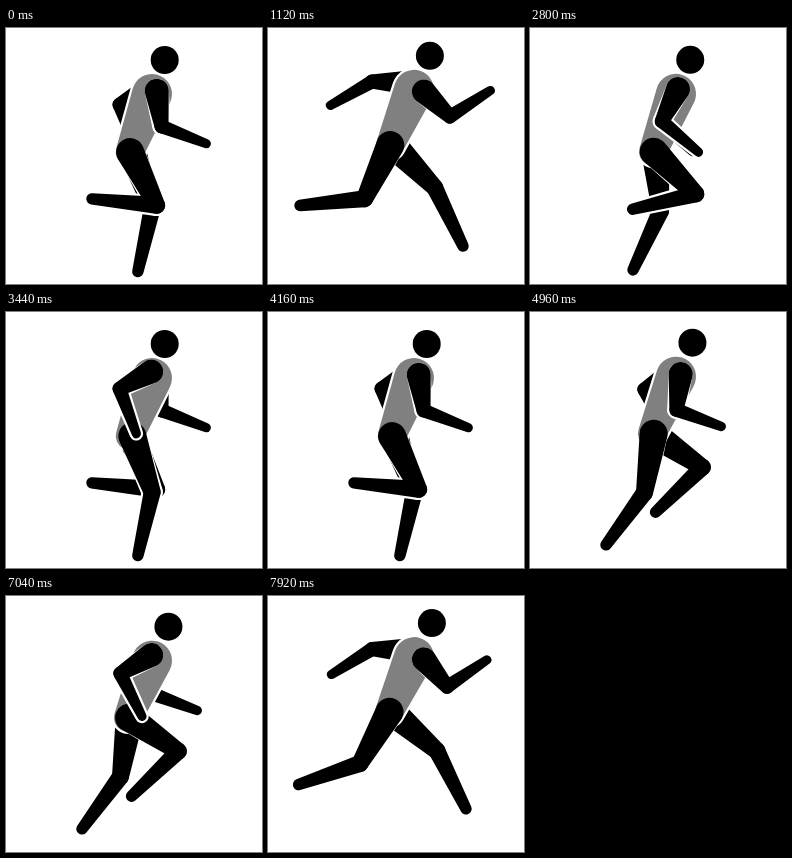
Write an HTML page with a canvas that moves like this. It is 256 by 256 pixels and loops after 8000 ms.

```html
<!DOCTYPE html>
<html lang="en">
<head>
<meta charset="utf-8">
<title>Runner</title>
<style>
  html, body { margin: 0; width: 100%; height: 100%; overflow: hidden; background: #fff; }
  canvas { display: block; width: 100vw; height: 100vh; }
</style>
</head>
<body>
<canvas id="stage" width="256" height="256"></canvas>
<script>
const ctx = document.getElementById('stage').getContext('2d');
const LOOP = 8000, TICK = 80;              // loop length and display step, ms
const POSE = 76.2, SHIFT = 27, POSES = 18; // the run cycle moves in even poses
const GAP = 2.2;                           // white line between body parts
const BLACK = '#000', GRAY = '#808080', WHITE = '#fff';

const cos = deg => Math.cos(deg * Math.PI / 180);
const sin = deg => Math.sin(deg * Math.PI / 180);

// Sum of harmonics of the cycle angle, each given as [amplitude, phase]
const wave = (turn, mean, ...parts) =>
  parts.reduce((sum, [amp, phase], i) => sum + amp * cos((i + 1) * turn - phase), mean);

// Joint angles: 0 points down, positive points forward
const thigh = turn => wave(turn, 17.1, [42.9, 85], [8, 43], [2.2, 95]);
const shin = turn => wave(turn, -37.8, [57.9, 134], [16.4, 182], [2.1, 233]);
const upperArm = turn => wave(turn, -27.5, [74, -66], [5.7, -85], [6, -41]);
const foreArm = turn => wave(turn, 40, [86, -69], [8.8, 58], [7.6, 150]);

const joint = (x, y, r) => ({ x, y, r });
const reach = (from, deg, len, r) => joint(from.x + len * sin(deg), from.y + len * cos(deg), r);

// Rounded, tapered bar between two joints
function bar(a, b, color) {
  const dx = b.x - a.x, dy = b.y - a.y;
  const dir = Math.atan2(dy, dx);
  const side = Math.acos((a.r - b.r) / Math.hypot(dx, dy));
  ctx.fillStyle = color;
  ctx.beginPath();
  ctx.arc(a.x, a.y, a.r, dir + side, dir - side + 2 * Math.PI);
  ctx.arc(b.x, b.y, b.r, dir - side, dir + side);
  ctx.fill();
}

function limb([root, mid, end], color) {
  bar(root, mid, color);
  bar(mid, end, color);
}

const widen = j => joint(j.x, j.y, j.r + GAP);

// The outline fades out towards the root, where the limb joins the torso
const outline = ([root, mid, end]) => limb([root, widen(mid), widen(end)], WHITE);

function leg(hip, turn) {
  const root = joint(hip.x + 1.5 + 1.5 * cos(turn - 140), hip.y, hip.r);
  const knee = reach(root, thigh(turn), 59.5, 8.5);
  return [root, knee, reach(knee, shin(turn), 65, 5.7)];
}

function arm(bob, turn) {
  const swing = cos(turn + 70);
  const shoulder = joint(148 + 8 * swing, 60 + 1.2 * bob + 4.5 * swing, 12);
  const elbow = reach(shoulder, upperArm(turn), 36, 7);
  return [shoulder, elbow, reach(elbow, foreArm(turn), 48, 4.6)];
}

function draw(turn) {
  const bob = cos(2 * turn - 15), sway = cos(2 * turn - 155);
  const head = joint(161.6 + 3.2 * sway, 29.6 + 2.5 * bob, 14);
  const chest = joint(146, head.y + 34, 20);
  const hip = joint(122.3 - 1.6 * sway, 120 + 4.2 * bob, 14);
  const nearLeg = leg(hip, turn), nearArm = arm(bob, turn);

  ctx.fillStyle = WHITE;
  ctx.fillRect(0, 0, 256, 256);

  limb(arm(bob, turn + 180), BLACK);
  limb(leg(hip, turn + 180), BLACK);

  bar(widen(chest), widen(hip), WHITE);
  outline(nearLeg);
  bar(chest, hip, GRAY);
  limb(nearLeg, BLACK);

  outline(nearArm);
  limb(nearArm, BLACK);

  ctx.beginPath();
  ctx.arc(head.x, head.y, head.r, 0, 2 * Math.PI);
  ctx.fill();
}

const start = performance.now();
function frame() {
  const t = (performance.now() - start) % LOOP;
  const shown = Math.floor(t / TICK) * TICK;
  draw(Math.floor((shown + SHIFT) / POSE) * 360 / POSES);
  requestAnimationFrame(frame);
}
frame();
</script>
</body>
</html>
```
